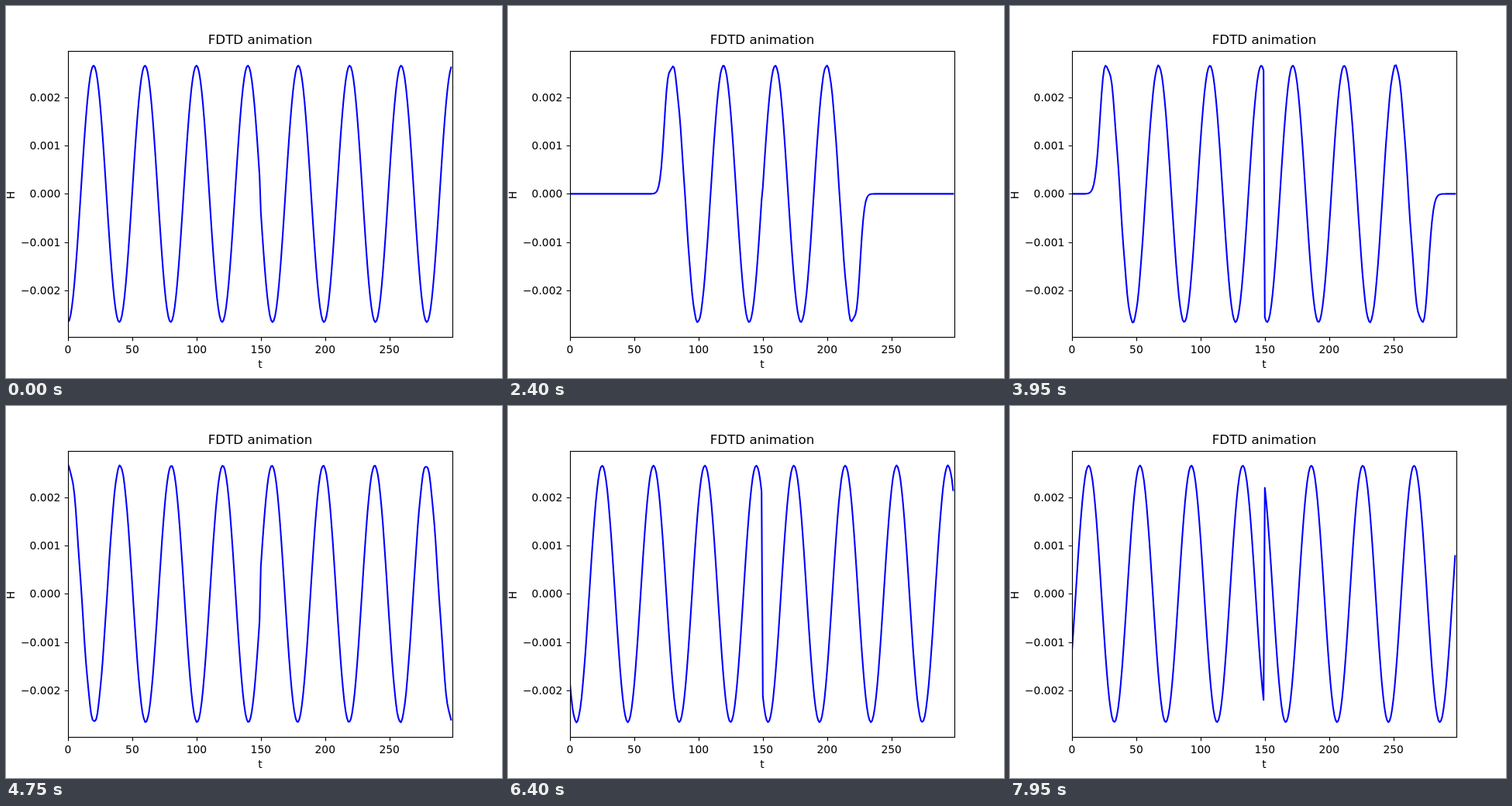
These frames come from a looping animation (640 by 480 pixels, 8 s). An HTML page:

```html
<!DOCTYPE html>
<html lang="en">
<head>
<meta charset="utf-8">
<title>FDTD animation</title>
<style>
  html, body { margin: 0; width: 100%; height: 100%; overflow: hidden; background: #fff; }
  svg { display: block; width: 100%; height: 100%; }
  text { font: 13.89px "DejaVu Sans", sans-serif; fill: #000; }
  .title { font-size: 16.67px; }
  .mid { text-anchor: middle; }
  .end { text-anchor: end; }
  .axis { fill: none; stroke: #000; stroke-width: 1.11; }
  #wave { fill: none; stroke: #00f; stroke-width: 2.083; stroke-linejoin: round; stroke-linecap: square; }
</style>
</head>
<body>
<svg viewBox="0 0 640 480">
  <clipPath id="area"><rect x="80" y="57.6" width="496" height="369.6"/></clipPath>
  <path id="ticks" class="axis"/>
  <g clip-path="url(#area)"><path id="wave"/></g>
  <rect class="axis" x="80.5" y="58.5" width="496" height="369"/>
  <g id="labels">
    <text class="title mid" x="328" y="49">FDTD animation</text>
    <text class="mid" x="328" y="467">t</text>
    <text class="mid" transform="translate(11 244) rotate(-90)">H</text>
  </g>
</svg>
<script>
const FRAME_MS = 50, FRAMES = 160, STEPS = 3;
const SPEED = 1.6805;          // cells per frame
const S = SPEED / STEPS;       // Courant number
const LAMBDA = 40, CELLS = 320, POINTS = 299, HALF = 150;
const AMP = 1 / 376.73;

const xPos = i => 80 + i * 496 / 299;
const yPos = h => 242.4 - h * 62350;
const sine = d => Math.sin(2 * Math.PI * d / LAMBDA);
const snap = v => Math.round(v) + 0.5;

function drawAxes() {
  let d = '';
  const label = (cls, x, y, str) => {
    const el = document.createElementNS('http://www.w3.org/2000/svg', 'text');
    el.setAttribute('class', cls);
    el.setAttribute('x', x);
    el.setAttribute('y', y);
    el.textContent = str;
    document.getElementById('labels').append(el);
  };
  for (let t = 0; t <= 250; t += 50) {
    d += `M${snap(xPos(t))} 427.5v4.86`;
    label('mid', xPos(t), 448, t);
  }
  for (let k = -2; k <= 2; k++) {
    const y = yPos(k / 1000);
    d += `M80.5 ${snap(y)}h-4.86`;
    label('end', 70.3, Math.round(y + 5), (k / 1000).toFixed(3).replace('-', '\u2212'));
  }
  document.getElementById('ticks').setAttribute('d', d);
}

// The field is antisymmetric about the emitter, so one side is enough.
function simulate() {
  const e = new Float64Array(CELLS + 1), h = new Float64Array(CELLS);
  // The loop opens on a settled wave, then the emitter switches on.
  const shots = [Float64Array.from({ length: HALF }, (_, k) => sine(19.6 - k - 0.5))];
  for (let n = 0; n < (FRAMES - 1) * STEPS; n++) {
    for (let k = 1; k < CELLS; k++) e[k] += S * (h[k - 1] - h[k]);
    e[0] = sine(Math.max(0, n * S - 0.22));
    for (let k = 0; k < CELLS; k++) h[k] += S * (e[k] - e[k + 1]);
    if (n % STEPS === STEPS - 1) shots.push(h.slice(0, HALF));
  }
  return shots;
}

function wavePath(side) {
  let d = '';
  for (let i = 0; i < POINTS; i++) {
    const v = i < HALF ? side[HALF - 1 - i] : -side[i - HALF];
    d += (i ? 'L' : 'M') + xPos(i).toFixed(2) + ' ' + yPos(v * AMP).toFixed(2);
  }
  return d;
}

drawAxes();
const shots = simulate(), wave = document.getElementById('wave');
const start = performance.now();
let shown = -1;

function render(now) {
  const frame = Math.floor(Math.max(0, now - start) / FRAME_MS) % FRAMES;
  if (frame !== shown) {
    wave.setAttribute('d', wavePath(shots[frame]));
    shown = frame;
  }
  requestAnimationFrame(render);
}
render(start);
</script>
</body>
</html>
```
